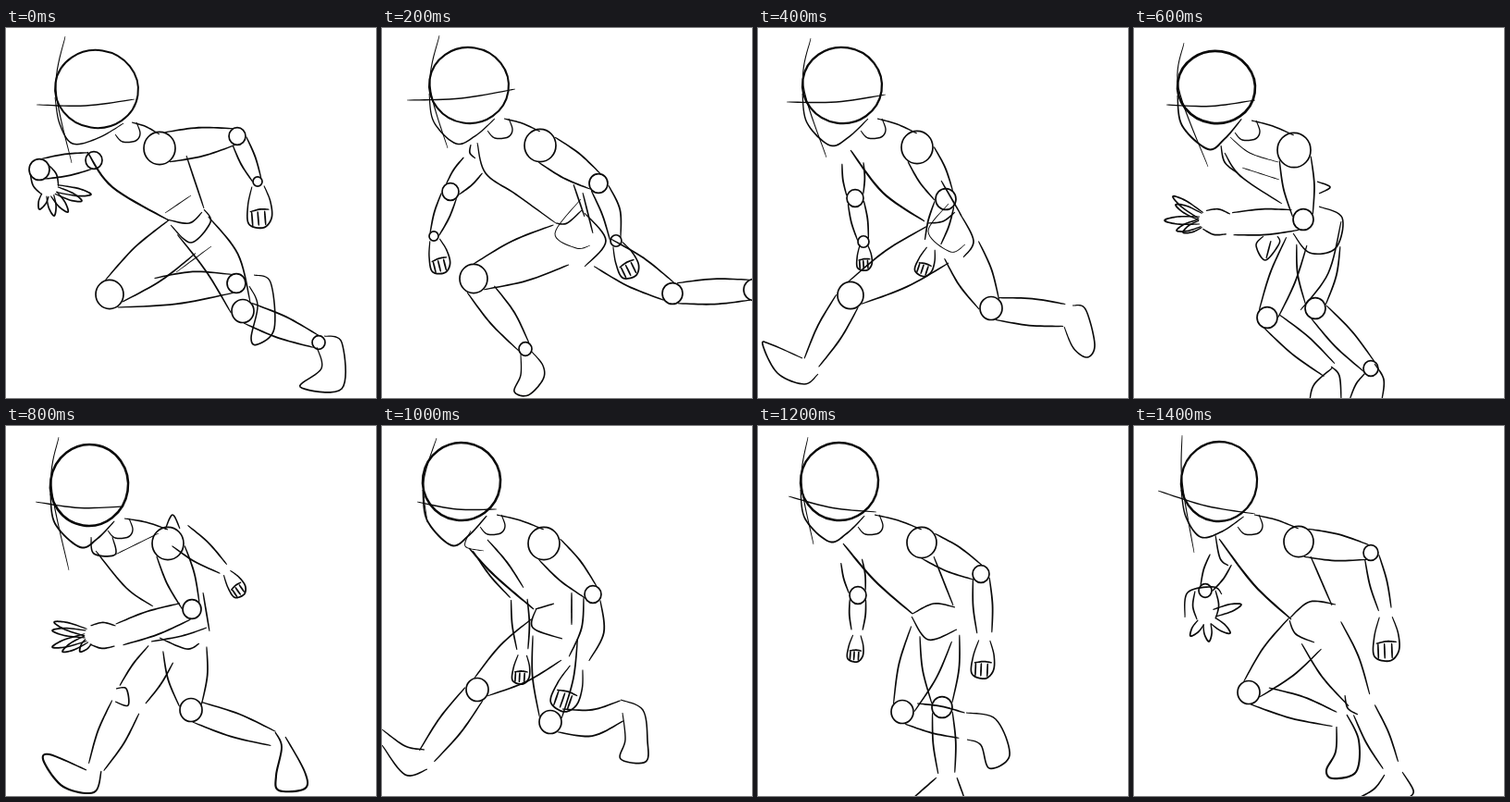
Animation of 400 by 400 pixels, one loop 1600 ms. Source, as an HTML page with a canvas:

```html
<!DOCTYPE html>
<html lang="en">
<head>
<meta charset="utf-8">
<title>Run cycle sketch</title>
<style>
html, body { margin: 0; width: 100%; height: 100%; overflow: hidden; background: #fff; }
canvas { display: block; width: 100vw; height: 100vh; }
</style>
</head>
<body>
<canvas id="stage"></canvas>
<script>
const STEP = 200;
const stage = document.getElementById("stage");
const ctx = stage.getContext("2d");
const poses = [];
const add = pose => poses.push(pose);

// Joints are [x, y, radius, bend]; a negative radius hides the joint ring.
add({ // push off
  skull: [98, 66, 45, 42, 2], upright: [64, 9, 71, 146], level: [33, 83, 139, 77], chin: [72, 125],
  nearArm: [[166, 130, 17], [250, 117, 9], [272, 166, 5]], nearFist: [276, 216],
  farArm: [[95, 143, 9], [36, 153, 11]], palm: [46, 172],
  tips: [[36, 196], [52, 203], [67, 199], [82, 187], [92, 180]],
  nearLeg: [[200, 218, -24], [112, 288, 15], [249, 276, 10]],
  farLeg: [[197, 205, -20], [256, 306, 12, -7], [338, 340, 7]],
  feet: "268,267 286,275 290,325 272,342 265,335 272,300 263,279|344,333 363,340 363,390 318,388 341,368 336,345",
  body: "b 88,134 115,172 176,208|195,138 214,195|174,207 198,211 212,199|t 172,200 200,181|178,213 200,232 221,210 214,196|t 222,236 184,264"
});
add({ // airborne
  skull: [94, 62, 43, 41, 2.1], upright: [62, 8, 71, 130], level: [27, 78, 144, 66], chin: [80, 125],
  nearArm: [[171, 127, 17], [234, 168, 10], [253, 230, 6, -4]], nearFist: [272, 269],
  farArm: [[103, 143, -14], [74, 177, 9], [56, 225, 5]], farFist: [66, 265],
  nearLeg: [[205, 230, -24], [99, 271, 15], [155, 347, 7]],
  farLeg: [[230, 238, -18], [314, 287, 11], [402, 283, 11]],
  feet: "150,353 150,375 143,393 158,397 174,380 174,365 162,350",
  body: "103,124 112,157 145,180 188,211|207,169 219,204|217,178 228,222|188,211 200,211 216,197|t 215,185 187,222 210,238 225,235|219,200 242,230 219,258|96,126 95,135 101,141"
});
add({ // reach
  skull: [91, 62, 43, 41, 2.3], upright: [57, 11, 74, 140], level: [31, 80, 138, 72], chin: [78, 127],
  nearArm: [[172, 129, 17], [203, 185, 11], [188, 235, -9]], nearFist: [177, 268],
  farArm: [[102, 140, -12], [105, 184, 9], [114, 231, 6]], farFist: [116, 262],
  nearLeg: [[205, 228, -24], [100, 289, 14], [56, 365, -9]],
  farLeg: [[215, 230, -22], [252, 303, 12], [336, 311, -12]],
  feet: "48,357 14,342 5,342 21,373 50,385 65,374|340,300 354,304 364,342 356,356 341,346 331,323",
  body: "b 100,132 135,178 180,209|198,165 220,203|184,211 200,209 213,199|t 206,190 184,220 208,242 224,234|218,200 233,230 222,248"
});
add({ // passing
  skull: [89, 64, 42, 39, 2.7], upright: [54, 16, 80, 150], level: [35, 83, 131, 78], chin: [80, 131],
  nearArm: [[173, 132, 18], [183, 207, 11], [102, 212, -12]], palm: [80, 208],
  tips: [[42, 182], [45, 191], [33, 208], [46, 219], [53, 221]],
  nearLeg: [[200, 222, -26], [196, 303, 11], [256, 368, 8]],
  farLeg: [[178, 225, -12], [144, 313, 11], [214, 372, -9]],
  feet: "260,363 270,380 268,402|250,373 240,385 233,402|215,367 195,385 190,402|213,366 222,376 224,402",
  body: "98,135 115,160 160,190|t 104,118 125,135 156,145|t 117,151 157,164|198,166 212,172 200,179|200,193 225,205 218,238 190,243 172,222|224,209 210,265 180,305|94,127 98,145 112,157|140,225 132,235 142,251 157,233 155,225|148,230 143,249"
});
add({ // second push
  skull: [90, 64, 42, 44, 2.6], upright: [57, 12, 68, 156], level: [32, 82, 127, 87], chin: [80, 131],
  nearArm: [[175, 127, 17], [201, 198, 10], [118, 227, -12]], palm: [95, 226],
  tips: [[52, 212], [50, 221], [50, 239], [61, 244], [80, 244]],
  farArm: [[182, 114, -15], [237, 156, -6]], farFist: [256, 183],
  nearLeg: [[192, 228, -26], [200, 307, 12], [292, 339, -8]],
  farLeg: [[172, 240, -16], [133, 296, -17], [96, 372, -9]],
  feet: "b 302,336 323,374 323,392 295,394 292,378 298,347 291,331|b 87,372 47,355 41,363 62,390 95,396 103,373",
  body: "97,135 130,175 159,195|213,180 220,222|166,229 195,241 209,235|157,233 190,227 217,218|t 118,139 165,116|172,112 180,96 188,111|92,120 95,138 118,139 115,120|119,284 130,284 132,302 118,298"
});
add({ // second contact
  skull: [86, 60, 42, 42, 2.6], upright: [59, 13, 49, 104], level: [38, 82, 124, 90], chin: [75, 129],
  nearArm: [[175, 127, 17], [228, 182, 9], [212, 256, -11, -8]], nearFist: [194, 308],
  farArm: [[103, 125, -10], [148, 183, -9], [152, 244, -6]], farFist: [150, 279],
  nearLeg: [[188, 215, -26], [182, 320, 12], [264, 307, -11, 8]],
  farLeg: [[190, 222, -30], [103, 285, 12], [46, 360, -10]],
  feet: "258,296 282,307 287,340 285,363 258,360 263,339 260,310|46,350 25,346 0,328|0,345 25,377 49,371",
  body: "b 94,132 122,162 164,198|167,197 163,218 195,230|205,180 205,215|166,198 186,192|t 96,113 90,130 110,135"
});
add({ // second passing
  skull: [88, 60, 42, 42, 2.4], upright: [54, 12, 60, 128], level: [33, 76, 128, 93], chin: [77, 125],
  nearArm: [[177, 126, 16], [241, 160, 9], [245, 227, -8]], nearFist: [243, 273],
  farArm: [[100, 140, -12], [108, 183, 9], [107, 223, -6]], farFist: [105, 255],
  nearLeg: [[192, 213, -25], [156, 309, 12], [226, 325, -14]],
  farLeg: [[196, 215, -23], [199, 304, 11], [204, 379, -9]],
  feet: "225,310 257,317 272,356 250,370 241,345 226,339|193,380 168,402|215,380 223,402",
  body: "b 92,127 126,167 167,203|190,141 211,194|167,203 190,192 213,196|166,206 184,231 215,220"
});
add({ // drive
  skull: [92, 60, 41, 43, 2.3], upright: [52, 10, 65, 137], level: [26, 70, 131, 95], chin: [72, 120],
  nearArm: [[178, 125, 16], [256, 137, 8], [272, 201, -7]], nearFist: [274, 254],
  farArm: [[97, 138, -14], [77, 178, 7]], palm: [78, 205],
  tips: [[61, 227], [81, 233], [104, 224], [116, 193]],
  nearLeg: [[194, 215, -26], [124, 288, 12], [220, 318, -8]],
  farLeg: [[196, 212, -26], [246, 301, -13], [279, 370, -9]],
  feet: "b 219,325 218,352 208,372 215,381 240,374 243,340 230,312|271,377 260,392 243,402|290,374 302,394 297,402",
  body: "b 92,122 130,172 170,209|191,141 214,194|168,208 190,190 218,193|168,210 175,225 195,234|88,118 93,143 102,151|55,207 58,180 86,174 95,182|228,291 231,305 242,312"
});

const mix = (a, b, t) => [a[0] + (b[0] - a[0]) * t, a[1] + (b[1] - a[1]) * t];
const spline = (a, b, c, d, u) =>
  b + u * ((c - a) + u * ((2 * a - 5 * b + 4 * c - d) + u * (3 * b - a - 3 * c + d))) / 2;

// Tapered brush line through the points.
function brush(pts, width = 1.7) {
  const at = i => pts[Math.max(0, Math.min(pts.length - 1, i))];
  const line = [], per = 10;
  for (let i = 0; i < pts.length - 1; i++) {
    for (let k = 0; k < per; k++) {
      line.push([0, 1].map(n => spline(at(i - 1)[n], at(i)[n], at(i + 1)[n], at(i + 2)[n], k / per)));
    }
  }
  line.push(at(pts.length));
  const last = line.length - 1, left = [], right = [];
  line.forEach(([x, y], i) => {
    const p = line[Math.max(0, i - 1)], q = line[Math.min(last, i + 1)];
    const dx = q[0] - p[0], dy = q[1] - p[1], len = Math.hypot(dx, dy) || 1;
    const half = width * (0.5 + 0.5 * Math.sqrt(Math.abs(Math.sin(Math.PI * i / last)))) / 2;
    left.push([x - dy / len * half, y + dx / len * half]);
    right.unshift([x + dy / len * half, y - dx / len * half]);
  });
  ctx.beginPath();
  left.concat(right).forEach(p => ctx.lineTo(...p));
  ctx.fill();
}

function ring(x, y, rx, ry, width = 1.7, angle = 0) {
  ctx.lineWidth = width;
  ctx.beginPath();
  ctx.ellipse(x, y, rx, ry, angle, 0, Math.PI * 2);
  ctx.stroke();
}

const weights = { b: 2.2, t: 1 };

function strokes(text) {
  text.split("|").forEach(s => {
    const words = s.split(" ");
    const width = weights[words[0]];
    if (width) words.shift();
    brush(words.map(w => w.split(",").map(Number)), width);
  });
}

// Maps (along, across) to the stage, measured from a towards b.
function axis(a, b) {
  const dx = b[0] - a[0], dy = b[1] - a[1], len = Math.hypot(dx, dy);
  const x = dx / len, y = dy / len;
  return { len, angle: Math.atan2(dy, dx), at: (u, v) => [a[0] + x * u - y * v, a[1] + y * u + x * v] };
}

// Two outlines per bone; the inner one starts where the fold of the joint ends.
function limb(joints) {
  let before = null;
  joints.slice(1).forEach((b, i) => {
    const a = joints[i], ax = axis(a, b), bend = b[3] || 0;
    const ra = Math.abs(a[2]), rb = Math.abs(b[2]);
    const turn = before === null ? 0 : Math.atan2(Math.sin(ax.angle - before), Math.cos(ax.angle - before));
    for (const side of [-1, 1]) {
      const inner = turn * side > 0;
      const fold = inner ? ra * Math.abs(Math.tan(turn / 2)) : 0;
      const from = Math.min(Math.max(ra * 0.5, fold), ax.len * 0.45);
      const to = ax.len - rb * 0.4;
      const bulge = ax.len * 0.03;
      brush([
        ax.at(from, side * (ra + (rb - ra) * from / ax.len)),
        ax.at((from + to) / 2, side * ((ra + rb) / 2 + bulge) + bend),
        ax.at(to, side * rb)
      ], 1.8);
    }
    before = ax.angle;
  });
  joints.forEach(([x, y, r]) => r > 0 && ring(x, y, r, r * 1.04));
}

function fist(wrist, tip) {
  const { len, at } = axis(wrist, tip);
  const draw = (...pts) => brush(pts.map(([u, v]) => at(u * len, v * len)), 1.8);
  draw([0.1, -0.13], [0.45, -0.24], [0.8, -0.24], [1, -0.05], [0.9, 0.26], [0.5, 0.25], [0.1, 0.13]);
  for (const v of [-0.1, 0.05, 0.18]) draw([0.64, v], [0.95, v]);
  draw([0.62, -0.2], [0.6, 0], [0.64, 0.22]);
}

function openHand(wrist, palm, tips) {
  tips.forEach(tip => {
    const { len, at } = axis(palm, tip);
    brush([at(9, -4), at(len * 0.7, -4), at(len, 0), at(len * 0.7, 4), at(9, 4)], 1.8);
  });
  const { len, at } = axis(wrist, palm);
  for (const side of [-1, 1]) brush([at(0, side * 11), at(len * 0.6, side * 14), at(len + 4, side * 10)]);
}

function head({ skull: [x, y, rx, ry, weight], upright: u, level: l, chin, nearArm: [[sx, sy, sr]] }) {
  ring(x, y, rx, ry, weight, 0.15);
  brush([[u[0], u[1]], [x - rx + 1, y], [u[2], u[3]]], 1.2);
  brush([[l[0], l[1]], [(l[0] + l[2]) / 2, (l[1] + l[3]) / 2 + 4], [l[2], l[3]]], 1.5);
  const ear = [x + rx * 0.65, y + ry * 0.88], cheek = mix(chin, ear, 0.5);
  brush([[x - rx, y + 9], [x - rx + 5, (y + chin[1]) / 2 + 8], chin, [cheek[0], cheek[1] + 5], ear], weight * 0.75);
  brush([[20, 49], [28, 57], [42, 56], [47, 48], [43, 36]].map(p => [x + p[0], y + p[1]]), 1.5);
  const nape = [x + 38, y + 36], top = [sx, sy - sr + 2], mid = mix(nape, top, 0.5);
  brush([nape, [mid[0], mid[1] - 2], top], 1.6);
}

function drawPose(p) {
  ctx.setTransform(stage.width / 400, 0, 0, stage.height / 400, 0, 0);
  ctx.fillStyle = "#fff";
  ctx.fillRect(0, 0, 400, 400);
  ctx.fillStyle = ctx.strokeStyle = "#0a0a0a";
  head(p);
  strokes(p.body);
  strokes(p.feet);
  [p.nearArm, p.farArm, p.nearLeg, p.farLeg].forEach(j => j && limb(j));
  const end = arm => arm[arm.length - 1];
  if (p.nearFist) fist(end(p.nearArm), p.nearFist);
  if (p.farFist) fist(end(p.farArm), p.farFist);
  if (p.palm) openHand(end(p.nearFist ? p.farArm : p.nearArm), p.palm, p.tips);
}

const start = performance.now();
let shown = -1;

function tick() {
  const i = Math.floor((performance.now() - start) / STEP) % poses.length;
  if (i !== shown) drawPose(poses[shown = i]);
  requestAnimationFrame(tick);
}

stage.width = innerWidth * devicePixelRatio || 400;
stage.height = innerHeight * devicePixelRatio || 400;
tick();
</script>
</body>
</html>
```
